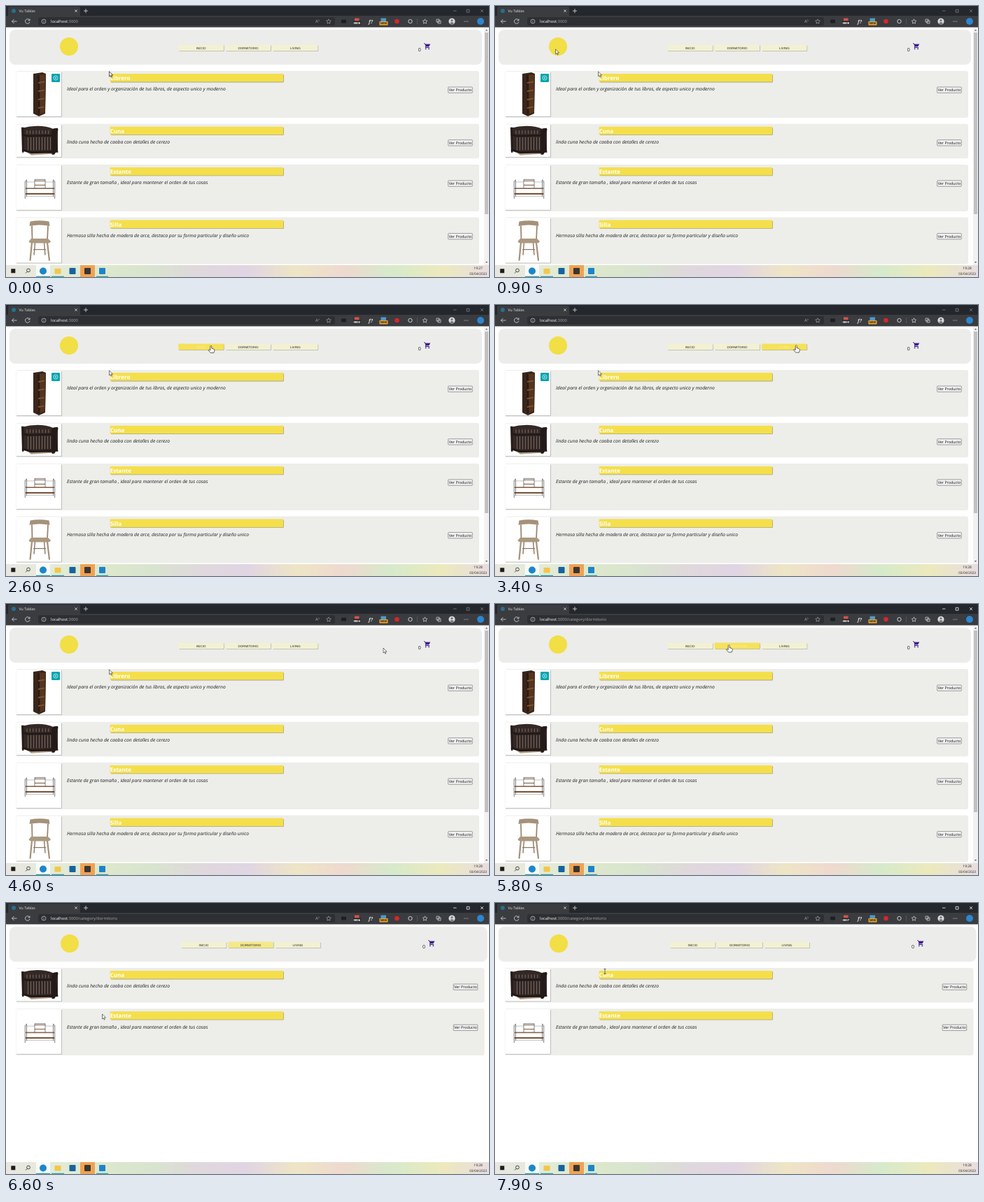
Write an HTML page that moves like this. It is 690 px wide and 388 px high and loops after 8 s.

```html
<!DOCTYPE html>
<html lang="es">
<head>
<meta charset="utf-8">
<title>Vu Tablas</title>
<style>
  html, body { margin: 0; height: 100%; overflow: hidden; background: #fff; }
  svg { display: block; width: 100vw; height: 100vh; }
  text { font-family: "Open Sans", "Noto Sans", sans-serif; text-rendering: geometricPrecision; white-space: pre; }
  .nav text { font-family: "Liberation Sans", Arial, sans-serif; }
</style>
</head>
<body>
<svg id="stage" viewBox="0 0 690 388"></svg>
<script>
const LOOP = 8000, PAGE_AT = 5900, URL_AT = 5600, FOCUS_AT = 4900, CLOCK_AT = 700;
const stage = document.getElementById('stage');
const $ = id => document.getElementById(id);

const rect = (x, y, w, h, fill, more = '') =>
  `<rect x="${x}" y="${y}" width="${w}" height="${h}" fill="${fill}" ${more}/>`;
const dot = (x, y, r, fill, more = '') => `<circle cx="${x}" cy="${y}" r="${r}" fill="${fill}" ${more}/>`;
const line = (d, color, w = 0.8, more = '') => `<path d="${d}" fill="none" stroke="${color}" stroke-width="${w}" ${more}/>`;
const shape = (d, fill, more = '') => `<path d="${d}" fill="${fill}" ${more}/>`;
const text = (x, y, s, size, fill, more = '') =>
  `<text x="${x}" y="${y}" font-size="${size}" fill="${fill}" ${more}>${s}</text>`;
const mid = 'text-anchor="middle"';
const repeat = (n, f) => Array.from({ length: n }, (_, i) => f(i)).join('');

// Product pictures, relative to the top of their card
const bookcase =
  shape('M39 4L52 2 57 4 56 61 47 65 39 61Z', '#39251a') +
  shape('M45 6L56 5 55 59 46 63Z', '#54351f') +
  shape('M45 6L48 6 48.5 61 46 63Z', '#2a1a11') +
  repeat(4, i => shape(`M46 ${16 + i * 12}L55.5 ${14.5 + i * 12}V${16.3 + i * 12}L46 ${18 + i * 12}Z`, '#7d5432')) +
  line('M56.2 5L55.3 60', '#4a2f1d', 1.3) +
  rect(65, 4, 12, 12, '#08a4ad', 'rx="1"') +
  dot(71, 10, 3, 'none', 'stroke="#d5f3f4" stroke-width=".8"') + dot(71, 10, 1, '#d5f3f4');

const crib =
  shape('M24 36L60 35 73 37 66 43 36 45Z', '#b59d86') +
  shape('M23 6Q34 3 45 3 58 3 67 7L74 6V38L66 42 36 41 23 36Z', '#332825') +
  repeat(9, i => line(`M${31.5 + i * 4} 19V${38 - i * 0.1}`, '#75675f', 1)) +
  repeat(8, i => line(`M${30 + i * 4.4} 9.5V14.5`, '#81736b', 0.9)) +
  line('M23 15L30 17.5 66 16.5', '#211917', 2.4) +
  line('M23 37L36 41 67 40', '#211917', 3) +
  shape('M22 5L25.5 5 25.5 41H23ZM65 10Q67 6 71 6.5 74.5 5 74.5 9 71 14 72 22 73 30 74.5 41H71L69 44H65.5Z', '#241b19');

const rack =
  rect(41, 23, 15, 0.9, '#6b4a30') + rect(41, 29, 15, 1, '#75543a') +
  rect(28, 33.5, 41, 1.6, '#8a6448') + rect(28, 41, 41, 2, '#74492c') +
  line('M27.3 49V24L29.5 22V46M69.7 49V24L67.5 22V46M41 34V21.5H56V34', '#4a4745', 0.7) +
  line('M27.3 25H41M56 25H69.7M28 45.5H69', '#8a8582', 0.5);

const wood = '#a4917a';
const chair =
  line('M37 12L37.5 33M60 12L59 33', '#988367', 1.7) +
  shape('M34.5 6Q48 3.5 61.5 6L62.5 12.5Q48 9.5 33.5 12.5Z', wood) +
  line('M37 36L34.5 62M59 36L62 62', wood, 2.2) +
  line('M41.5 36L40 54M54.5 36L56 54M39 46H57', '#8d7a63', 1.4) +
  shape('M36 30.5H60L64 34.5Q63 37 59 37H37Q33.5 37 32.5 34.5Z', '#ab987f');

const products = [
  ['Librero', 'Ideal para el orden y organización de tus libros, de aspecto unico y moderno', 67, bookcase],
  ['Cuna', 'linda cuna hecha de caoba con detalles de cerezo', 49.5, crib],
  ['Estante', 'Estante de gran tamaño , ideal para mantener el orden de tus cosas', 67, rack],
  ['Silla', 'Hermosa silla hecha de madera de arce, destaca por su forma particular y diseño unico', 67, chair]
];

function card([name, about, h, art], y, right) {
  return `<g transform="translate(0 ${y})">` +
    rect(14, 0, right - 14, h, '#ededea', 'rx="3"') +
    rect(15.2, 1.8, 64.6, h - 3, '#b4b4b2') + rect(14.5, 1, 64.5, h - 3, '#fff') + art +
    rect(149.5, 4.8, 247.5, 11.6, '#a9a68f', 'rx="1.5"') + rect(148.7, 4, 247.5, 11.6, '#f4df4b', 'rx="1"') +
    text(148.7, 13.3, name, 8, '#fff', 'font-weight="700"') +
    text(87, 28.4, about, 6.75, '#1c1c1c', 'font-style="italic"') +
    rect(right - 44.3, 23, 34.6, 8.4, '#f1f1f1', 'stroke="#666" stroke-width=".6" rx=".8"') +
    text(right - 27, 29.3, 'Ver Producto', 5.4, '#111', mid) + '</g>';
}

function page(id, right, list) {
  let y = 93, cards = '';
  for (const p of list) {
    cards += card(p, y, right);
    y += p[2] + 8.7;
  }
  return `<g id="${id}">` + rect(5, 34, right - 1, 50, '#ececea', 'rx="8"') + cards + '</g>';
}

const scrollbar = rect(683, 31, 7, 340, '#f1f1f1') + rect(684, 38, 5, 260, '#c1c1c1') +
  shape('M684.8 35.5L686.5 33.5 688.2 35.5ZM684.8 366L686.5 368 688.2 366Z', '#666');

const nav = ['INICIO', 'DORMITORIO', 'LIVING'].map((s, i) => {
  const x = i * 67.3;
  return rect(x + 0.7, 56.2, 64.6, 8.7, '#b5b5aa', 'rx="1"') +
    rect(x, 55.5, 64.6, 8.7, '#f2f1d3', `rx="1" id="btn${i}"`) +
    text(x + 32.4, 61.6, s, 4.5, '#222', `${mid} id="lbl${i}"`);
}).join('');

const browser =
  rect(0, 0, 690, 14, '#24272c') + shape('M3 14V3Q3 1 5 1H104Q106 1 106 3V14Z', '#3a3c3f') +
  rect(0, 14, 690, 16.5, '#3a3c3f') + rect(46, 16, 424, 12, '#2d2f32', 'rx="3"') +
  dot(11, 7, 3, '#27708d') + text(18.5, 9, 'Vu Tablas', 5.3, '#e6e6e6') +
  line('M98.3 5.3l3.4 3.4m0-3.4l-3.4 3.4M111 7h6M114 4v6', '#ddd', 0.8) +
  `<g id="controls">` + line('M639 7h4.5M678 5l4 4m0-4l-4 4M658.2 5.2h3.8v3.8h-3.8z', '#fff', 0.8) + '</g>' +
  line('M15.5 22H8.5M11.5 19L8.5 22 11.5 25M33.6 20.2A3.3 3.3 0 1 0 34 22.8M34 18.5V20.8H31.6', '#ddd') +
  dot(54, 22, 3, 'none', 'stroke="#ccc" stroke-width=".7"') + line('M54 21.6v2M54 20v.7', '#ccc', 0.7) +
  `<text x="64" y="24" font-size="5.75" fill="#fff">localhost<tspan fill="#aaa" id="path"></tspan></text>` +
  text(442, 24, 'A', 6, '#aaa') + line('M446.5 19.5q1.5 1 0 2.5', '#aaa', 0.6) +
  line('M461 18.8l1 2.1 2.3.3-1.7 1.6.4 2.3-2-1.1-2 1.1.4-2.3-1.7-1.6 2.3-.3z', '#bbb', 0.6) +
  rect(479, 19.5, 7, 5, '#1d1f22', 'rx="1"') +
  rect(498, 17.5, 6.5, 4, '#d9534a') + rect(496, 21.5, 11, 5.5, '#202225') +
  text(501.3, 26, '0000', 4.3, '#fff', `${mid} font-weight="700" id="count"`) +
  text(521, 24.5, 'f?', 7, '#ddd', `${mid} font-style="italic" font-weight="700"`) +
  rect(535.5, 17.5, 7.5, 5, '#4a9bd2') + rect(533.5, 22, 12, 5.5, '#f2a72e') +
  text(539.5, 26.4, 'NEW', 4.3, '#222', `${mid} font-weight="700"`) +
  dot(558.5, 22, 3.3, '#d6262c') +
  dot(577.5, 22, 2.7, 'none', 'stroke="#ddd" stroke-width=".9"') + line('M587.5 18v8', '#666', 0.6) +
  line('M598.5 18.8l1 2.1 2.3.3-1.7 1.6.4 2.3-2-1.1-2 1.1.4-2.3-1.7-1.6 2.3-.3zM615 19h4v4h-4zM617 21h4v4h-4z', '#ddd', 0.7) +
  dot(637, 22, 4.6, '#d7d9dc') + dot(637, 20.7, 1.6, '#777') + shape('M634 25q3-4 6 0-3 2.5-6 0Z', '#777') +
  repeat(3, i => dot(655 + i * 2.3, 22, 0.6, '#ddd')) + dot(678, 22, 5, '#2c86d1');

const tints = ['#e9e6e0', '#e3ebd8', '#dde8cc', '#d8e4cf', '#dfd8dc', '#e0d5e3', '#eee5c6', '#eed9cf', '#d6eacb', '#ece9bd', '#e8dde0'];
const taskbar =
  `<linearGradient id="sky">${tints.map((c, i) => `<stop offset="${i / 10}" stop-color="${c}"/>`).join('')}</linearGradient>` +
  rect(0, 371, 690, 17, 'url(#sky)') + rect(43, 371, 20, 17, '#f7faf6') + rect(106, 371, 21, 17, '#f0a254') +
  rect(7.3, 376.3, 6, 6, '#1c1c1c') +
  dot(32, 378.5, 2.4, 'none', 'stroke="#222" stroke-width=".8"') + line('M30.3 380.3L28 382.6', '#222') +
  dot(53, 379.5, 5, '#1c86c8') + rect(69.5, 376, 9, 7.5, '#f3c64b', 'rx=".8"') +
  rect(90.5, 375, 9, 9, '#17639f', 'rx="1"') + rect(112, 375, 9, 9, '#3a3630', 'rx="1"') +
  rect(133, 375, 9, 9, '#1f83cc', 'rx="1"') +
  [[43, 20], [65, 18], [129, 17]].map(([x, w]) => rect(x, 386.8, w, 1.2, '#21a3b4')).join('') +
  text(674.6, 377.3, '19:27', 4.9, '#222', `${mid} id="clock"`) +
  text(674.6, 385.3, '03/04/2023', 4.7, '#222', mid);

const arrow = shape('M0 0V7L1.6 5.6 2.8 8.2 3.8 7.7 2.7 5.2H5Z', '#fff', 'stroke="#222" stroke-width=".6"');
const pointers = {
  arrow,
  hand: shape('M-1 1Q0-1 1 1V4L4 5Q5.5 5.5 5 8L4 10.5H-.5L-3.5 7.3Q-4 6-2.5 6L-1 7Z', '#fff', 'stroke="#222" stroke-width=".7"'),
  beam: line('M-1.5-3.5H1.5M0-3.5V3.5M-1.5 3.5H1.5', '#333', 0.7)
};

const purple = '#3d1a8c';
const cart = text(588.7, 64.5, '0', 7, '#222') + '<g transform="translate(596.5 52.3) scale(.45)">' +
  shape('M1 2v2h2l3.6 7.6-1.35 2.45C4.5 15.4 5.5 17 7 17h12v-2H7.4l1.1-2H16c.75 0 1.4-.4 1.75-1L21.7 5H5.2L4.3 2z', purple) +
  dot(7, 20, 2, purple) + dot(17, 20, 2, purple) + '</g>';

stage.innerHTML = rect(0, 0, 690, 388, '#fff') +
  page('home', 676, products) + page('room', 683.5, products.slice(1, 3)) +
  `<g id="bar">${scrollbar}</g>` + dot(90, 58, 13, '#f2de45', 'id="logo"') +
  `<g id="nav" class="nav">${nav}</g><g id="cart">${cart}</g>` +
  browser + taskbar + `<g id="rest" transform="translate(147.5 93.8)">${arrow}</g>` +
  '<g id="pointer">' + Object.entries(pointers).map(([k, s]) => `<g id="${k}">${s}</g>`).join('') + '</g>';

// time, x, y of the pointer tip
const path = [
  [0, 147.5, 93.8], [300, 147.5, 93.8], [1000, 83, 60], [1600, 81, 58.5], [1750, 88, 60], [2100, 200, 59],
  [2500, 282, 58], [2900, 350, 58], [3300, 430, 57.5], [3600, 431, 57.5], [4200, 539, 63], [4800, 539, 63],
  [5300, 335, 58.5], [5950, 334, 58.5], [6600, 137.5, 159], [7400, 296, 208], [7850, 157, 98], [8000, 157, 98]
];
const hovers = [[2350, 2650], [2700, 3050], [3100, 3700]];
const roomHover = [5200, 6450];

const clamp = v => Math.max(0, Math.min(1, v));
const within = (t, [a, b]) => t >= a && t < b;
const fade = (t, [a, b], d) => clamp((t - a) / d) * (1 - clamp((t - b) / d));
const mix = (a, b, k) => `rgb(${a.map((v, i) => Math.round(v + (b[i] - v) * k))})`;
const set = (id, name, v) => $(id).setAttribute(name, v);
const show = (id, on) => set(id, 'visibility', on ? 'visible' : 'hidden');

function tip(t) {
  const i = path.findIndex(p => p[0] > t), [t0, x0, y0] = path[i - 1], [t1, x1, y1] = path[i];
  const k = (t - t0) / (t1 - t0), e = k * k * (3 - 2 * k);
  return [x0 + (x1 - x0) * e, y0 + (y1 - y0) * e];
}

function draw(t) {
  const room = t >= PAGE_AT, grow = fade(t, [1000, 1700], 250);
  show('home', !room);
  show('bar', !room);
  show('room', room);
  show('rest', t < FOCUS_AT);

  set('logo', 'cx', room ? 91 : 90 + 2 * grow);
  set('logo', 'r', 13 + 3.8 * grow);
  set('logo', 'fill', mix([242, 222, 69], [255, 250, 88], grow));
  set('nav', 'transform', `translate(${room ? 250 : 246.3 + 3.3 * grow} 0)`);
  set('cart', 'transform', `translate(${room ? 6.2 : grow} 0)`);

  hovers.forEach((span, i) => {
    const k = Math.max(fade(t, span, 180), i === 1 ? fade(t, roomHover, 380) : 0);
    set('btn' + i, 'fill', mix([242, 241, 211], [245, 226, 88], k));
    set('lbl' + i, 'fill', mix([34, 34, 34], [250, 240, 170], clamp(k * 2.5 - 1.5)));
  });

  $('path').textContent = ':3000' + (t >= URL_AT ? '/category/dormitorio' : '');
  $('count').textContent = String(Math.floor(t / 1000)).padStart(4, '0');
  $('clock').textContent = t < CLOCK_AT ? '19:27' : '19:28';
  set('controls', 'opacity', t < FOCUS_AT ? 0.4 : 0.95);

  const hand = [[950, 1800], ...hovers, [5200, 6050]].some(s => within(t, s));
  const kind = hand ? 'hand' : t >= 7750 ? 'beam' : 'arrow';
  for (const k in pointers) show(k, k === kind);
  set('pointer', 'transform', `translate(${tip(t)})`);
}

const start = performance.now();
function tick() {
  draw((performance.now() - start) % LOOP);
  requestAnimationFrame(tick);
}
tick();
</script>
</body>
</html>
```
